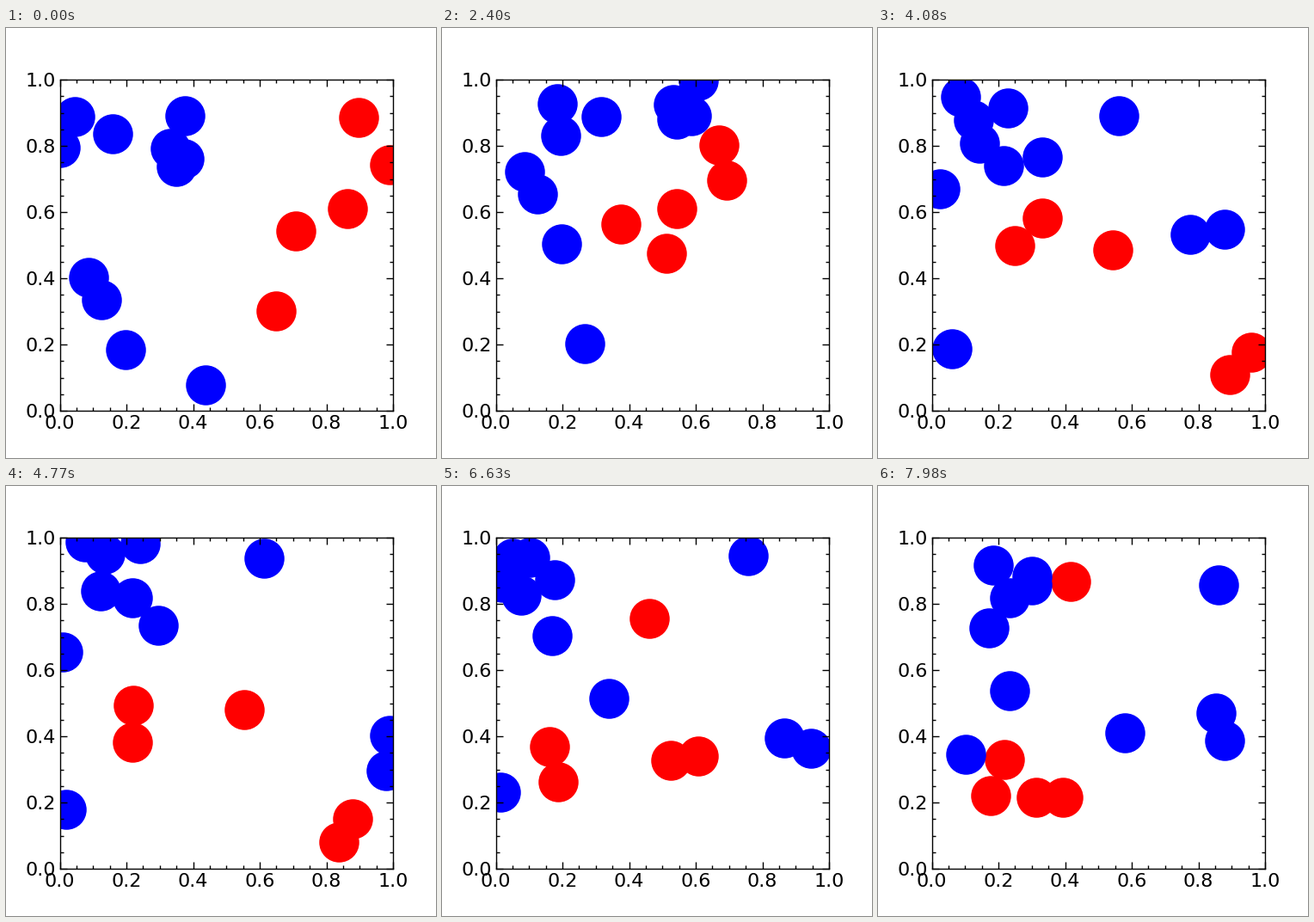
A matplotlib script for the animation above (8 s loop, 500x500 px).

```python
from itertools import combinations

import numpy as np
import matplotlib.pyplot as plt
from matplotlib.animation import FuncAnimation

STEPS = 267
LOOP = 8000
RADIUS = 0.06
SPEED = 0.004
TOP_SPEED = 0.018

# starting places: the left half is blue, the right half red
START = np.array([
    (0.045, 0.889), (0.159, 0.836), (0.376, 0.890), (0.332, 0.793),
    (0.374, 0.760), (0.350, 0.738), (0.001, 0.795), (0.086, 0.403),
    (0.125, 0.335), (0.197, 0.184), (0.437, 0.078), (0.897, 0.887),
    (0.989, 0.744), (0.863, 0.610), (0.708, 0.542), (0.649, 0.302),
])
IS_RED = START[:, 0] > 0.5
PAIRS = np.array(list(combinations(range(len(START)), 2)))


def collide(pos, vel):
    """Swap the velocity along the line of centres of each touching pair."""
    gap = pos[PAIRS[:, 0]] - pos[PAIRS[:, 1]]
    touching = np.hypot(*gap.T) < 2 * RADIUS
    i, j = PAIRS[touching].T
    gap = gap[touching]
    share = ((vel[i] - vel[j]) * gap).sum(1) / (gap ** 2).sum(1)
    push = share[:, None] * gap
    vel[i], vel[j] = vel[i] - push, vel[j] + push


def bounce(pos, vel):
    """Turn balls whose centres have crossed a wall."""
    vel[pos > 1] = -np.abs(vel[pos > 1])
    vel[pos < 0] = np.abs(vel[pos < 0])


def simulate():
    pos = START.copy()
    vel = np.where(IS_RED[:, None], (-SPEED, 0.0), (0.0, SPEED))
    track = [pos]
    for _ in range(STEPS - 1):
        collide(pos, vel)
        bounce(pos, vel)
        speed = np.hypot(*vel.T)
        vel *= (TOP_SPEED / np.maximum(speed, TOP_SPEED))[:, None]
        pos = pos + vel
        track.append(pos)
    return track


plt.rcParams.update({
    "font.family": "DejaVu Sans",
    "font.size": 16,
    "axes.linewidth": 1,
    "axes.axisbelow": False,
    "xtick.top": True,
    "ytick.right": True,
})
for axis in ("xtick", "ytick"):
    plt.rcParams.update({
        f"{axis}.direction": "in",
        f"{axis}.labelsize": 16,
        f"{axis}.major.size": 6,
        f"{axis}.minor.size": 3,
        f"{axis}.major.width": 1,
        f"{axis}.minor.width": 1,
        f"{axis}.minor.visible": True,
    })

fig, ax = plt.subplots(figsize=(5, 5), dpi=100)
ax.set_xlim(0, 1)
ax.set_ylim(0, 1)

size = 2 * RADIUS * ax.get_window_extent().width * 72 / fig.dpi
style = dict(marker="o", linestyle="none", markersize=size, markeredgewidth=0)
red_dots, = ax.plot([], [], color="red", **style)
blue_dots, = ax.plot([], [], color="blue", **style)

track = simulate()


def draw(step):
    red_dots.set_data(*track[step][IS_RED].T)
    blue_dots.set_data(*track[step][~IS_RED].T)
    return red_dots, blue_dots


anim = FuncAnimation(fig, draw, frames=STEPS, interval=LOOP / STEPS,
                     repeat=True, repeat_delay=0)
plt.show()
```
